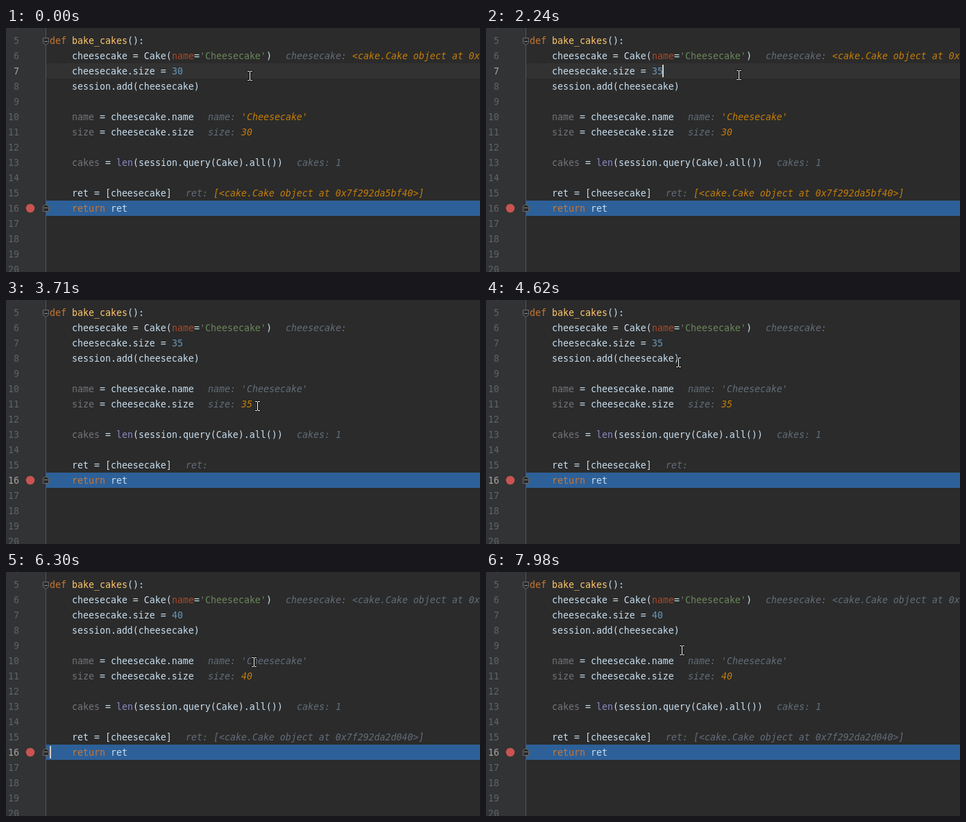
Recreate the animation shown at these times as an HTML page with a canvas. Size 683x352 px, loop 8 s.

```html
<!DOCTYPE html>
<html lang="en">
<head>
<meta charset="utf-8">
<title>Editing a paused function</title>
<style>
  html, body { margin: 0; width: 100%; height: 100%; overflow: hidden; background: #2b2b2b; }
  canvas { display: block; }
</style>
</head>
<body>
<canvas id="stage" width="683" height="352"></canvas>
<script>
const ctx = document.getElementById('stage').getContext('2d');
const LOOP = 8000, STEP = 70, BLINK = 350;
const CHAR = 8, ROW = 22, CODE_X = 63, GUTTER = 57;
const FONT = '13.288px "DejaVu Sans Mono", monospace';
const TEXT = '#c8dff0', KEYWORD = '#cc7832', UNUSED = '#72737a';
const HINT = '#626d79', CHANGED = '#c47d08';

const rowTop = line => 7 + ROW * (line - 5);

// Editor state from its start time on; caret is its x, blink is the reset time.
const states = [
  { from: 0, line: 7, size: '30', run: 0 },
  { from: 140, line: 7, size: '30', run: 0, caret: 254 },
  { from: 490, line: 7, size: '30', run: 0 },
  { from: 700, line: 7, size: '30', run: 0, caret: 254 },
  { from: 840, line: 7, size: '30', run: 0, caret: 254, selected: true },
  { from: 1470, line: 7, size: '3', run: 0, caret: 246 },
  { from: 1820, line: 7, size: '35', run: 0, caret: 254 },
  { from: 2660, line: 16, size: '35', run: 1, caret: 63, blink: true },
  { from: 4830, line: 7, size: '35', run: 1, caret: 254 },
  { from: 4970, line: 7, size: '35', run: 1, caret: 254, selected: true },
  { from: 5460, line: 7, size: '4', run: 1, caret: 246 },
  { from: 5740, line: 7, size: '40', run: 1, caret: 254 },
  { from: 6230, line: 16, size: '40', run: 2, caret: 63, blink: true }
];

// Debugger values after each run.
const runs = [
  { object: '<cake.Cake object at 0x7f292da5bf40>', size: '30', color: CHANGED },
  { object: '', size: '35', color: HINT },
  { object: '<cake.Cake object at 0x7f292da2d040>', size: '40', color: HINT }
];

// Pointer path: time, x, y.
const path = [
  [0, 351, 69], [2170, 351, 69], [2240, 364, 68], [2940, 350, 171], [3080, 350, 165],
  [3150, 350, 165], [3430, 362, 153], [4410, 362, 153], [4620, 277, 90], [4830, 277, 54],
  [5040, 277, 54], [5180, 313, 75], [5810, 313, 75], [6510, 376, 153], [6790, 342, 162],
  [7070, 342, 162], [7280, 354, 164], [7420, 354, 164], [7490, 345, 166], [7700, 345, 166],
  [7840, 362, 152], [7980, 282, 113], [LOOP, 282, 113]
];

function rect(x, y, w, h, color) {
  ctx.fillStyle = color;
  ctx.fillRect(x, y, w, h);
}

function write(text, x, line, color) {
  ctx.fillStyle = color;
  ctx.fillText(text, x, rowTop(line) + 16);
  return x + text.length * CHAR;
}

// Tokens alternate between text and colour.
function writeTokens(line, x, tokens) {
  for (let i = 0; i < tokens.length; i += 2) x = write(tokens[i], x, line, tokens[i + 1]);
  return x;
}

function codeLine(line, indent, tokens, hint) {
  ctx.font = FONT;
  const end = writeTokens(line, CODE_X + indent * CHAR, tokens);
  if (!hint) return;
  ctx.font = 'italic ' + FONT;
  writeTokens(line, end + 20, hint);
}

function drawCode(size, run) {
  const { object, color } = run;
  codeLine(5, 0, ['def ', KEYWORD, 'bake_cakes', '#ffc66d', '():', TEXT]);
  codeLine(6, 4, ['cheesecake = Cake(', TEXT, 'name', '#aa4926', '=', TEXT,
    "'Cheesecake'", '#6a8759', ')', TEXT], ['cheesecake: ', HINT, object, color]);
  codeLine(7, 4, ['cheesecake.size = ', TEXT, size, '#6897bb']);
  codeLine(8, 4, ['session.add(cheesecake)', TEXT]);
  codeLine(10, 4, ['name', UNUSED, ' = cheesecake.name', TEXT],
    ['name: ', HINT, "'Cheesecake'", color]);
  codeLine(11, 4, ['size', UNUSED, ' = cheesecake.size', TEXT],
    ['size: ', HINT, run.size, CHANGED]);
  codeLine(13, 4, ['cakes', UNUSED, ' = ', TEXT, 'len', '#8888c6',
    '(session.query(Cake).all())', TEXT], ['cakes: 1', HINT]);
  codeLine(15, 4, ['ret = [cheesecake]', TEXT],
    ['ret: ', HINT, object && `[${object}]`, color]);
  codeLine(16, 4, ['return ', KEYWORD, 'ret', TEXT]);
}

function foldMark(y, dir) {
  ctx.beginPath();
  ctx.moveTo(53.5, y - 5 * dir);
  ctx.lineTo(61.5, y - 5 * dir);
  ctx.lineTo(61.5, y + 2 * dir);
  ctx.lineTo(57.5, y + 5 * dir);
  ctx.lineTo(53.5, y + 2 * dir);
  ctx.closePath();
  ctx.fillStyle = '#2b2b2b';
  ctx.fill();
  ctx.strokeStyle = '#6c6c6c';
  ctx.lineWidth = 1;
  ctx.stroke();
  rect(55, y - 0.5, 5, 1, '#8a8a8a');
}

function drawGutter(current) {
  ctx.font = FONT;
  for (let line = 4; line <= 20; line++) {
    const label = String(line);
    write(label, 19 - label.length * CHAR, line, line === current ? '#a4a3a3' : '#606366');
  }
  rect(GUTTER, 0, 1, 352, '#555555');
  ctx.fillStyle = '#c75450';
  ctx.beginPath();
  ctx.arc(35, 260, 6.3, 0, 2 * Math.PI);
  ctx.fill();
  foldMark(19.5, 1);
  foldMark(259.5, -1);
}

function drawPointer(t) {
  if ((t >= 1470 && t < 2170) || (t >= 5460 && t < 5810)) return;
  const i = path.findIndex(p => p[0] > t);
  const [t0, x0, y0] = path[i - 1], [t1, x1, y1] = path[i];
  const k = (t - t0) / (t1 - t0);
  const x = Math.round(x0 + (x1 - x0) * k), y = Math.round(y0 + (y1 - y0) * k);
  const parts = [[-3, -7, 3, 1], [1, -7, 3, 1], [0, -6, 1, 12], [-3, 6, 3, 1], [1, 6, 3, 1]];
  for (const [dx, dy, w, h] of parts) rect(x + dx - 1, y + dy - 1, w + 2, h + 2, '#151515');
  for (const [dx, dy, w, h] of parts) rect(x + dx, y + dy, w, h, '#ffffff');
}

function draw(now) {
  const t = Math.floor(now % LOOP / STEP) * STEP;
  const state = states.findLast(s => s.from <= t);
  rect(0, 0, 683, 352, '#2b2b2b');
  rect(0, 0, GUTTER, 352, '#313335');
  if (state.line === 7) rect(GUTTER, rowTop(7), 626, ROW, '#323232');
  rect(GUTTER, rowTop(16), 626, ROW, '#2d6099');
  if (state.selected) rect(239, rowTop(7), 2 * CHAR, ROW, '#214283');
  drawGutter(state.line);
  drawCode(state.size, runs[state.run]);
  const lit = !state.blink || Math.floor((t - state.from) / BLINK) % 2 === 0;
  if (state.caret && lit) rect(state.caret, rowTop(state.line) + 2, 2, 18, '#d0d0d0');
  drawPointer(t);
}

const start = performance.now();
function tick() {
  draw(performance.now() - start);
  requestAnimationFrame(tick);
}
tick();
</script>
</body>
</html>
```
